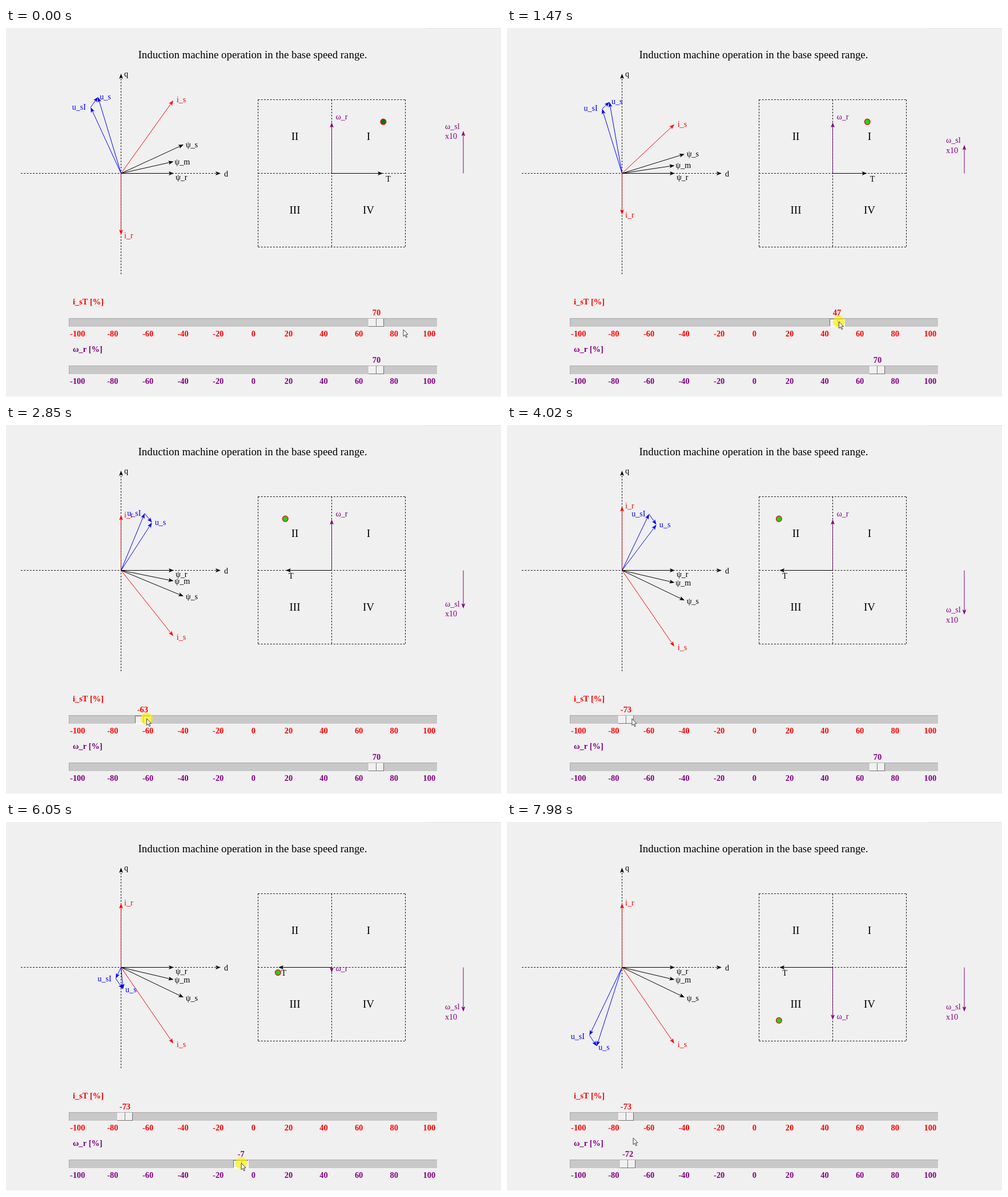
Recreate the animation shown at these times as an HTML page with a canvas. Size 867 by 646 pixels, loop 8 s.

```html
<!DOCTYPE html>
<html lang="en">
<head>
<meta charset="utf-8">
<title>Induction machine operation</title>
<style>
  html, body { margin: 0; width: 100%; height: 100%; overflow: hidden; background: #f0f0f0; }
  canvas { display: block; }
</style>
</head>
<body>
<canvas id="stage" width="867" height="646"></canvas>
<script>
const ctx = document.getElementById('stage').getContext('2d');
const LOOP = 8000;
const RED = '#ff0000', BLUE = '#0000ff', PURPLE = '#800080', BLACK = '#000';
const SERIF = '"Liberation Serif", "Times New Roman", serif';
const SMALL = `14.1px ${SERIF}`, LARGE = `18.85px ${SERIF}`, BOLD = `bold 14.4px ${SERIF}`;

// Slider drags as [time, value]
const torqueDrag = [[1110, 70], [1470, 47], [1920, -15], [2170, -29], [2850, -63], [3220, -73]];
const speedDrag = [[5460, 70], [6280, -37], [6750, -66], [7410, -72]];

const mix = (a, b, u) => a + (b - a) * u;
const progress = (t, from, to) => Math.min(1, Math.max(0, (t - from) / (to - from)));
const ease = (t, from, to) => {
  const u = progress(t, from, to);
  return u * u * (3 - 2 * u);
};
const sliderX = value => 433.3 + 3.08 * value;

// Monotone cubic interpolation, resting at both ends
function sample(keys, t) {
  const last = keys.length - 1;
  const slope = i => i < 0 || i >= last ? 0 : (keys[i + 1][1] - keys[i][1]) / (keys[i + 1][0] - keys[i][0]);
  const tangent = i => {
    const a = slope(i - 1), b = slope(i);
    return a * b > 0 ? 2 * a * b / (a + b) : 0;
  };
  let i = 0;
  while (i < last - 1 && t >= keys[i + 1][0]) i++;
  const [t0, v0] = keys[i], [t1, v1] = keys[i + 1];
  const u = progress(t, t0, t1), v = 1 - u;
  return mix(v0, v1, u * u * (3 - 2 * u)) + (t1 - t0) * u * v * (tangent(i) * v - tangent(i + 1) * u);
}

function text(str, x, y, color = BLACK, font = SMALL, align = 'left') {
  ctx.font = font;
  ctx.fillStyle = color;
  ctx.textAlign = align;
  ctx.fillText(str, x, y);
}

function line(x1, y1, x2, y2, color = BLACK, dash = []) {
  ctx.strokeStyle = color;
  ctx.lineWidth = 1;
  ctx.setLineDash(dash);
  ctx.beginPath();
  ctx.moveTo(x1, y1);
  ctx.lineTo(x2, y2);
  ctx.stroke();
  ctx.setLineDash([]);
}

function arrow(x1, y1, x2, y2, color = BLACK, dash) {
  const length = Math.hypot(x2 - x1, y2 - y1);
  if (length < 1) return;
  const dx = (x2 - x1) / length, dy = (y2 - y1) / length;
  const point = (back, side) => ctx.lineTo(x2 - dx * back - dy * side, y2 - dy * back + dx * side);
  line(x1, y1, x2 - dx * 6, y2 - dy * 6, color, dash);
  ctx.fillStyle = color;
  ctx.beginPath();
  point(0, 0);
  point(9, 3.4);
  point(7, 0);
  point(9, -3.4);
  ctx.fill();
}

const DASH = [2.7, 2.6];
const dashed = (...ends) => line(...ends, BLACK, DASH);

// Vertical arrow lying on a dashed axis that shows through
function axisArrow(x, y, rise, color) {
  arrow(x, y, x, y - rise, color);
  ctx.globalAlpha = 0.5;
  dashed(x, y, x, y - rise * 0.92);
  ctx.globalAlpha = 1;
}

function drawPhasors(torque, speed) {
  const ox = 201.5, oy = 254.5;
  const vector = ([x, y], color) => arrow(ox, oy, ox + x, oy - y, color);
  const label = (str, [x, y], dx, color) => text(str, ox + x * 1.02 + dx, oy - y * 1.01 + 5, color);

  const is = [91.5, 1.825 * torque], ir = [0, -1.535 * torque];
  const psiR = [92.5, 0], psiM = [92, 0.295 * torque], psiS = [109.5, 0.72 * torque];
  const sync = 0.014 * speed + 0.00109 * torque;
  const usI = [-sync * psiS[1], sync * psiS[0]];
  const us = usI.map((v, i) => v + 0.14 * is[i]);

  arrow(26, oy, 376, oy, BLACK, DASH);
  arrow(ox, 431, ox, 80, BLACK, DASH);
  text('d', 382, 259.5);
  text('q', 207, 85);

  vector(psiR);
  vector(psiM);
  vector(psiS);
  vector(is, RED);
  axisArrow(ox, oy, ir[1], RED);
  vector(usI, BLUE);
  vector(us, BLUE);
  arrow(ox + usI[0], oy - usI[1], ox + us[0], oy - us[1], BLUE);

  text('ψ_r', 297, 265.5);
  label('ψ_m', psiM, 0);
  label('ψ_s', psiS, 1.5);
  label('i_s', is, 4, RED);
  label('i_r', ir, 5.5, RED);
  label('u_sI', usI, -31.5, BLUE);
  label('u_s', us, 4, BLUE);
}

function drawQuadrants(torque, speed, started) {
  const ox = 570.5, oy = 254.5, half = 129;
  for (const k of [-half, 0, half]) {
    dashed(ox - half, oy + k, ox + half, oy + k);
    dashed(ox + k, oy - half, ox + k, oy + half);
  }
  ['II', 'I', 'III', 'IV'].forEach((name, i) =>
    text(name, ox + (i % 2 - 0.5) * half, oy + (i < 2 ? -0.5 : 0.5) * half + 6, BLACK, LARGE, 'center'));

  const tipX = ox + 1.28 * torque;
  arrow(ox, oy, tipX, oy);
  text('T', tipX + 9.5, 269, BLACK, SMALL, 'center');
  axisArrow(ox, oy, 1.275 * speed, PURPLE);
  text('ω_r', 577.5, 251.5 - 1.305 * speed, PURPLE);

  ctx.beginPath();
  ctx.arc(ox + 1.29 * torque, oy - 1.29 * speed, 4.8, 0, 7);
  ctx.fillStyle = started ? '#0fdc14' : '#107010';
  ctx.fill();
  ctx.strokeStyle = started ? '#f01818' : '#dc2020';
  ctx.lineWidth = 1.6;
  ctx.stroke();

  const slip = 1.06 * torque;
  arrow(801, oy, 801, oy - slip, PURPLE);
  text('ω_sl', 769, 251 - slip, PURPLE);
  text('x10', 769, 268.5 - slip, PURPLE);
}

function bevel(x, y, w, h, fill, light, dark) {
  ctx.fillStyle = fill;
  ctx.fillRect(x, y, w, h);
  ctx.fillStyle = light;
  ctx.fillRect(x, y, w, 1);
  ctx.fillRect(x, y, 1, h);
  ctx.fillStyle = dark;
  ctx.fillRect(x, y + h - 1, w, 1);
  ctx.fillRect(x + w - 1, y, 1, h);
}

function drawSlider(name, top, value, color, pressed) {
  text(name, 117, top - 24.5, color, BOLD);
  text(value, sliderX(value), top - 5.5, color, BOLD, 'center');
  bevel(110, top, 646, 16, '#c8c8c8', '#a8a8a8', '#f4f4f4');
  const x = Math.round(sliderX(value) - 13.5), shades = ['#fff', '#707070'];
  if (pressed) shades.reverse();
  bevel(x, top + 1, 14, 14, '#f0f0f0', ...shades);
  bevel(x + 14, top + 1, 13, 14, '#f0f0f0', ...shades);
  for (let v = -100; v <= 100; v += 20) text(v, sliderX(v), top + 31.5, color, BOLD, 'center');
}

function drawCursor(x, y, glow) {
  ctx.fillStyle = 'rgba(255, 243, 0, 0.66)';
  ctx.beginPath();
  ctx.arc(x, y, 10.5 * glow, 0, 7);
  ctx.fill();
  ctx.save();
  ctx.translate(x, y);
  ctx.fillStyle = '#fafafa';
  ctx.strokeStyle = '#303030';
  ctx.lineWidth = 0.9;
  const shape = new Path2D('M0 0V11.8L2.7 9.3 4.6 13.8 6.4 13 4.5 8.7 8 8.5Z');
  ctx.fill(shape);
  ctx.stroke(shape);
  ctx.restore();
}

function draw(now) {
  const t = now % LOOP;
  const torque = Math.round(sample(torqueDrag, t)), speed = Math.round(sample(speedDrag, t));
  const dragTorque = t >= 900 && t < 3670, dragSpeed = t >= 5480 && t < 7690;

  ctx.fillStyle = '#f0f0f0';
  ctx.fillRect(0, 0, 867, 646);
  ctx.fillStyle = '#e4e4e4';
  ctx.fillRect(735, 0, 132, 1);
  ctx.fillStyle = '#fcfcfc';
  ctx.fillRect(0, 645, 867, 1);

  text('Induction machine operation in the base speed range.', 432, 53, BLACK, LARGE, 'center');
  drawPhasors(torque, speed);
  drawQuadrants(torque, speed, t >= 1130);
  drawSlider('i_sT [%]', 508, torque, RED, dragTorque);
  drawSlider('ω_r [%]', 591, speed, PURPLE, dragSpeed);

  // The pointer goes from slider to slider, leads each thumb slightly, then leaves
  const lead = t + 20, reach = ease(t, 50, 620), cross = ease(t, 4000, 4770);
  const gripX = keys => sliderX(sample(keys, lead)) + 9.5;
  const x = mix(mix(696, gripX(torqueDrag), reach), gripX(speedDrag), cross);
  const y = mix(mix(528, 514, reach), 597, cross) - 44 * ease(t, 7690, 7980);
  drawCursor(x, y, dragTorque ? progress(t, 870, 960) : dragSpeed ? 1 : 0);
  requestAnimationFrame(draw);
}
requestAnimationFrame(draw);
</script>
</body>
</html>
```
